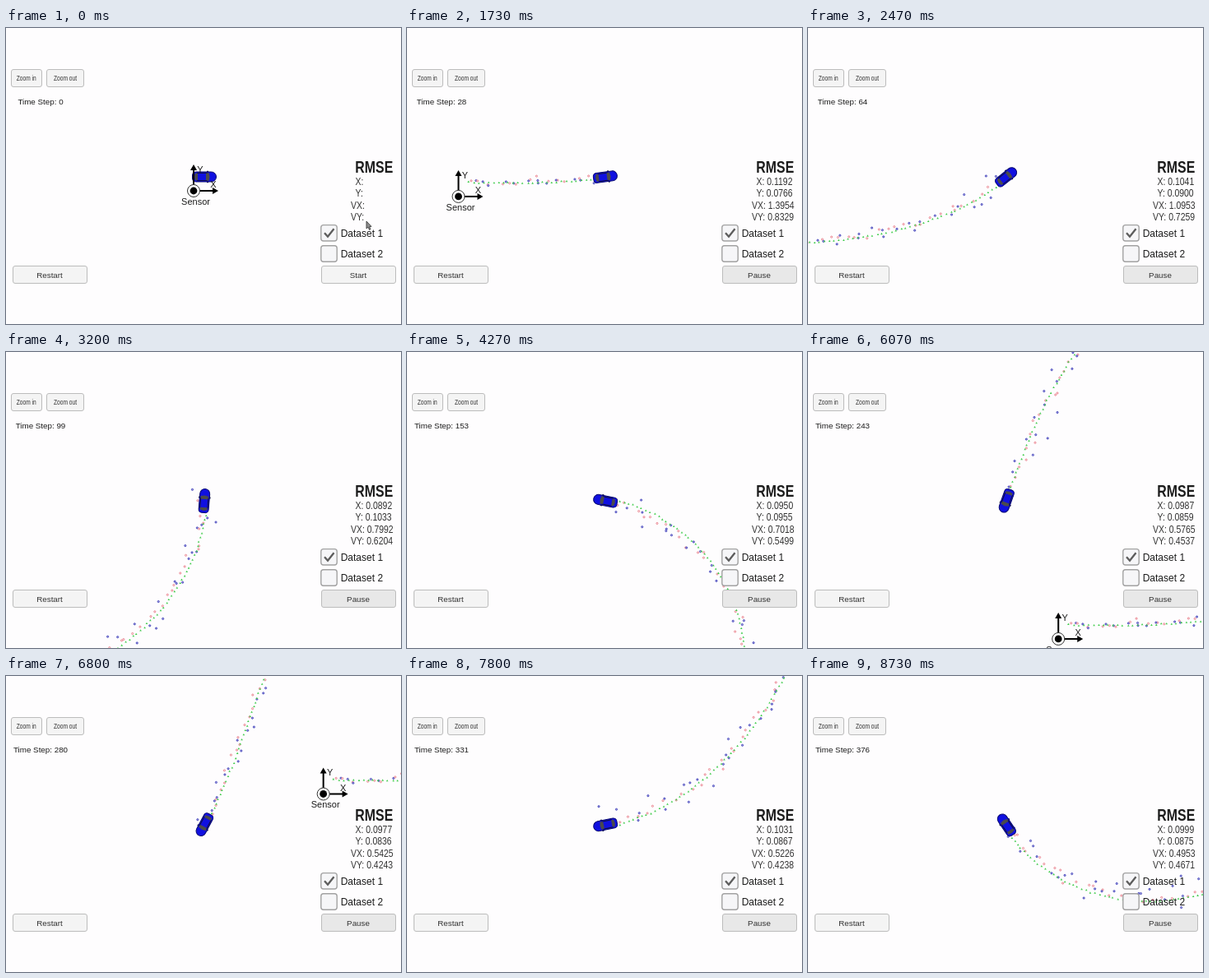
Animation of 480 by 360 pixels, one loop 8.79 s. Source, as an HTML page with a canvas:

```html
<!DOCTYPE html>
<html lang="en">
<head>
<meta charset="utf-8">
<title>Tracking simulator</title>
<style>
  html, body { margin: 0; width: 100%; height: 100%; overflow: hidden; background: #fefdfe; }
  canvas { display: block; }
</style>
</head>
<body>
<canvas id="stage" width="480" height="360"></canvas>
<script>
const ctx = document.getElementById('stage').getContext('2d');
const LOOP = 8790, FRAME = 1000 / 15, START = 1530;
const CAR = { x: 241, y: 181 };
const CONDENSED = 0.78;
const INK = '#1c1c1c', GREY = '#333';
const LAST_STEP = 380, ESTIMATE_LAG = 3;

// key readings: time, step, RMSE of x, y, vx, vy
const LOG = [
  [1730, 28, 0.1192, 0.0766, 1.3954, 0.8329],
  [3200, 99, 0.0892, 0.1033, 0.7992, 0.6204],
  [5200, 199, 0.1, 0.0887, 0.6171, 0.4887],
  [6800, 280, 0.0977, 0.0836, 0.5425, 0.4243],
  [7800, 331, 0.1031, 0.0867, 0.5226, 0.4238],
  [8730, 376, 0.0999, 0.0875, 0.4953, 0.4671],
];
const PAUSES = [[3330, 3600], [7330, 7470]];
const CURSOR = [[200, 438, 235], [470, 452, 313], [730, 442, 303]];

// linear between keys, extended before the first and after the last
function sample(keys, t) {
  let i = 0;
  while (i < keys.length - 2 && t >= keys[i + 1][0]) i++;
  const a = keys[i], b = keys[i + 1];
  const k = (t - a[0]) / (b[0] - a[0]);
  return a.map((v, j) => v + (b[j] - v) * k);
}

function random(seed) {
  const v = Math.sin(seed * 127.1 + 11.7) * 43758.5453;
  return v - Math.floor(v);
}
const noise = seed => (random(seed) + random(seed + 0.31) + random(seed + 0.67) - 1.5) * 2;

const TURN = 125.5 * Math.PI / 180;
const phase = s => s * Math.PI / 250;
const heading = s => TURN * (1 - Math.cos(phase(s)));
const yawRate = s => TURN * Math.sin(phase(s)) * Math.PI / 250;

// vehicle path relative to the sensor
const path = [{ x: 13, y: -17 }];
for (let s = 0; s < LAST_STEP; s++) {
  const mid = s + 0.5;
  const speed = 5.97 * (1 - 0.08 * Math.sin(phase(mid)) ** 2);
  const { x, y } = path[s];
  path.push({
    x: x + speed * Math.cos(heading(mid)) - 0.03,
    y: y - speed * Math.sin(heading(mid)) + 0.018,
  });
}

// even steps are lidar (x, y), odd steps radar (range, angle)
function reading(p, s) {
  if (s % 2 === 0) return { x: p.x + 3.4 * noise(s), y: p.y + 3.4 * noise(s + 500) };
  const range = Math.hypot(p.x, p.y) + 6 * noise(s);
  const angle = Math.atan2(p.y, p.x) + 0.025 * noise(s + 500);
  return { x: range * Math.cos(angle), y: range * Math.sin(angle) };
}

// the estimate swings slightly wide in turns
function estimate(p, s) {
  const wide = 150 * yawRate(s);
  return {
    x: p.x + wide * Math.sin(heading(s)) + 0.5 * noise(s + 900),
    y: p.y + wide * Math.cos(heading(s)) + 0.5 * noise(s + 1300),
  };
}

const readings = path.map(reading);
const estimates = path.map(estimate);

function label(text, x, cy, size, { align = 'center', color = INK, weight = '', squeeze = 1 } = {}) {
  ctx.save();
  ctx.translate(x, cy + size * 0.36);
  ctx.scale(squeeze, 1);
  ctx.font = `${weight} ${size}px "Liberation Sans", Arial, sans-serif`;
  ctx.textAlign = align;
  ctx.fillStyle = color;
  ctx.fillText(text, 0, 0);
  ctx.restore();
}

function box(x, y, w, h, { radius = 2.5, fill = '#f4f4f4', stroke = '#bcbcbc', width = 1 } = {}) {
  ctx.beginPath();
  ctx.roundRect(x + 0.5, y + 0.5, w - 1, h - 1, radius);
  ctx.fillStyle = fill;
  ctx.fill();
  ctx.lineWidth = width;
  ctx.strokeStyle = stroke;
  ctx.stroke();
}

function polygon(points, color) {
  ctx.beginPath();
  points.forEach(([x, y]) => ctx.lineTo(x, y));
  ctx.closePath();
  ctx.fillStyle = color;
  ctx.fill();
}

function disc(x, y, r, fill, stroke, width = 1) {
  ctx.beginPath();
  ctx.arc(x, y, r, 0, 7);
  ctx.fillStyle = fill;
  ctx.fill();
  if (!stroke) return;
  ctx.lineWidth = width;
  ctx.strokeStyle = stroke;
  ctx.stroke();
}

function drawTrail(step) {
  for (let s = 0; s <= step; s++) {
    const { x, y } = readings[s];
    if (s % 2) disc(x, y, 1.1, '#a4a4e0', '#4444bc', 0.9);
    else disc(x, y, 1.1, '#fbe4e6', '#ea8490', 0.9);
  }
  for (let s = 0; s <= step - ESTIMATE_LAG; s++) {
    const { x, y } = estimates[s];
    polygon([[x, y - 1.3], [x + 1.3, y + 1], [x - 1.3, y + 1]], '#40cc4c');
  }
}

function drawSensor() {
  ctx.fillStyle = '#000';
  ctx.fillRect(-1, -27, 2, 20);
  ctx.fillRect(7, -1, 19, 2);
  polygon([[0, -32], [4, -25], [-4, -25]], '#000');
  polygon([[30, 0], [23, -4], [23, 4]], '#000');
  disc(0, 0, 7.5, '#fff', '#333', 1);
  disc(0, 0, 4.4, '#000');
  label('Y', 8, -26, 11);
  label('X', 24, -7.5, 11);
  label('Sensor', 2.5, 12.8, 11);
}

function drawCar(angle) {
  ctx.save();
  ctx.translate(CAR.x, CAR.y);
  ctx.rotate(-angle);
  ctx.fillStyle = '#101040';
  ctx.fillRect(3, -7.2, 2, 14.4);
  box(-15, -6.5, 30, 13, { radius: [4, 6, 6, 4], fill: '#1010e0', stroke: '#080870' });
  for (const side of [-1, 1]) {
    ctx.fillStyle = '#10103c';
    ctx.fillRect(-9, side * 4.6 - 0.5, 13, 1);
  }
  polygon([[2, -4], [5.5, -5], [6.5, 0], [5.5, 5], [2, 4]], '#4a4a4c');
  polygon([[-8, -4], [-11, -4.5], [-12, 0], [-11, 4.5], [-8, 4]], '#4a4a4c');
  ctx.restore();
}

function drawCheckbox(cy, text, checked) {
  box(382.3, cy - 10.2, 20.4, 20.4, { radius: 3, fill: '#f6f6f8', stroke: '#a2a2a2', width: 1.4 });
  if (checked) {
    ctx.beginPath();
    ctx.moveTo(387, cy);
    ctx.lineTo(391, cy + 4.5);
    ctx.lineTo(398.5, cy - 5);
    ctx.lineWidth = 2.3;
    ctx.strokeStyle = '#5c5c5c';
    ctx.stroke();
  }
  label(text, 406.7, cy, 12, { align: 'left' });
}

function drawPanel(running, step, rmse) {
  const narrow = { squeeze: CONDENSED, color: GREY };
  box(6, 50, 38, 22);
  box(49, 50, 46, 22);
  label('Zoom in', 24.7, 61.3, 8.5, narrow);
  label('Zoom out', 72, 61.3, 8.5, narrow);
  label('Time Step: ' + step, 42, 89.3, 9.8);

  label('RMSE', 447.3, 168.5, 20.4, { weight: 'bold', squeeze: CONDENSED });
  ['X:', 'Y:', 'VX:', 'VY:'].forEach((name, i) => {
    const text = running ? `${name} ${rmse[i].toFixed(4)}` : name;
    const x = i < 2 ? 424.5 : 419;
    label(text, x, 186 + 14.5 * i, 13.4, { ...narrow, align: 'left' });
  });

  drawCheckbox(249.3, 'Dataset 1', true);
  drawCheckbox(274.5, 'Dataset 2', false);
  box(8, 289, 91, 22);
  label('Restart', 53, 300, 9.8, { color: GREY });
  box(383, 289, 91, 22, { fill: running ? '#e8e8e8' : '#f4f4f4' });
  label(running ? 'Pause' : 'Start', 428, 300, 9.8, { color: GREY });
}

function drawCursor(t) {
  if (t >= 1070) return;
  const [, x, y] = sample(CURSOR, Math.min(730, Math.max(200, t)));
  ctx.save();
  ctx.globalAlpha = t >= 930 ? 0.5 : 1;
  ctx.translate(x, y);
  polygon([[0, 0], [0, 9], [2, 7.2], [3.6, 10.5], [5, 9.8], [3.6, 6.6], [6, 6.4]], '#8c8c8c');
  ctx.lineWidth = 0.9;
  ctx.strokeStyle = '#404040';
  ctx.stroke();
  ctx.restore();
}

function frameTime(now) {
  const frame = Math.floor((now % LOOP + 5) / FRAME);
  const t = Math.round(frame * FRAME / 10) * 10;
  const pause = PAUSES.find(([from, to]) => t > from && t < to);
  return pause ? pause[0] : t;
}

function draw(now) {
  const t = frameTime(now);
  const running = t >= START;
  const [, steps, ...rmse] = sample(LOG, t);
  const step = running ? Math.round(steps) : 0;
  const inWorld = paint => {
    ctx.save();
    ctx.translate(CAR.x - path[step].x, CAR.y - path[step].y);
    paint();
    ctx.restore();
  };

  ctx.fillStyle = '#fefdfe';
  ctx.fillRect(0, 0, 480, 360);
  if (running) inWorld(() => drawTrail(step));
  drawCar(heading(step));
  inWorld(drawSensor);
  drawPanel(running, step, rmse);
  drawCursor(t);
}

const begin = performance.now();
function tick() {
  draw(performance.now() - begin);
  requestAnimationFrame(tick);
}
tick();
</script>
</body>
</html>
```
